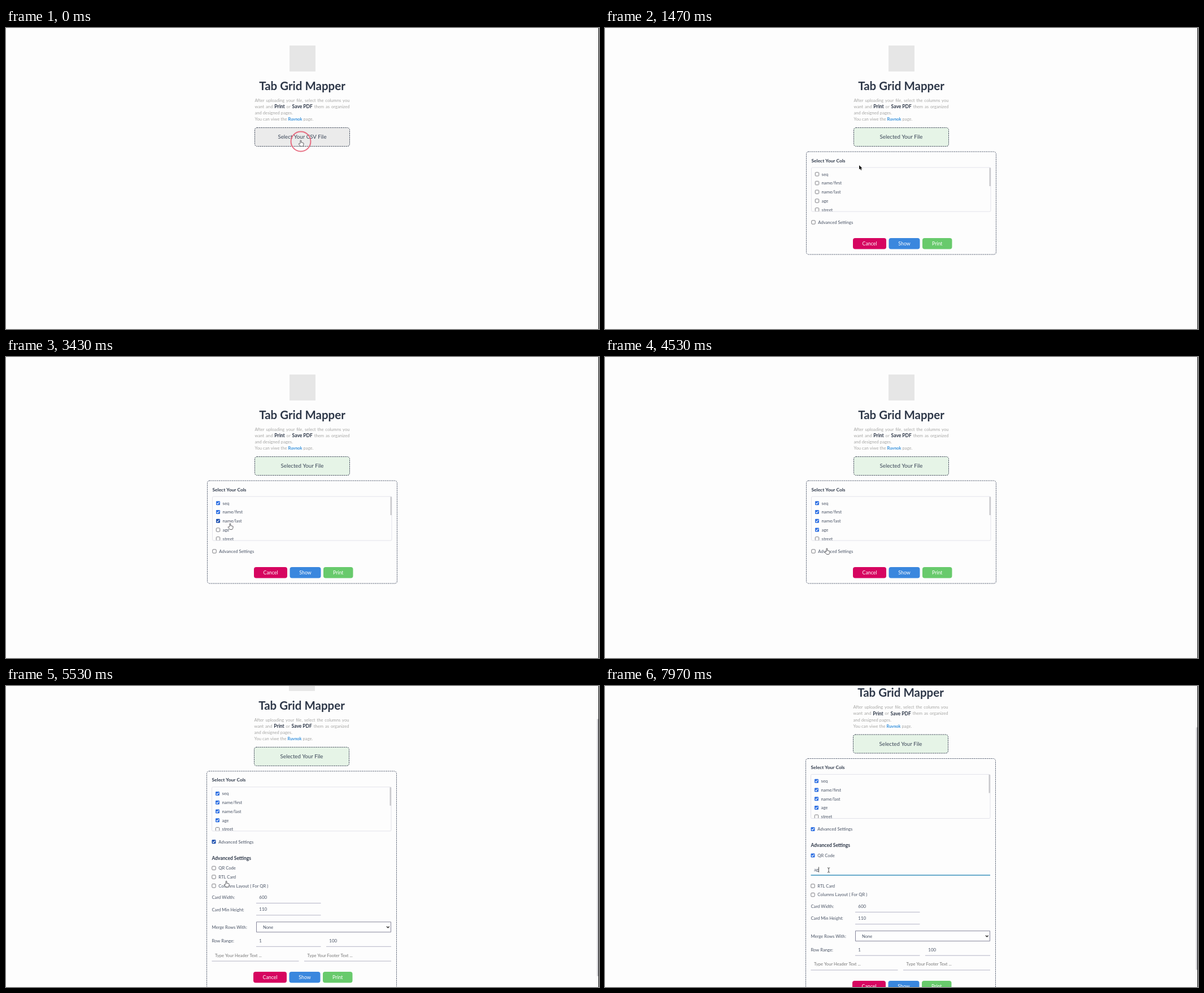
Recreate the animation shown at these times as an HTML page with a canvas. Size 1050 by 533 pixels, loop 8 s.

```html
<!DOCTYPE html>
<html lang="en">
<head>
<meta charset="utf-8">
<title>Tab Grid Mapper</title>
<style>
  html, body { margin: 0; width: 100%; height: 100%; overflow: hidden; background: #fdfdfd; }
  canvas { display: block; }
</style>
</head>
<body>
<canvas id="stage" width="1050" height="533"></canvas>
<script>
const W = 1050, H = 533, LOOP = 8000;
const ctx = document.getElementById('stage').getContext('2d');
const INK = '#2d3748', LABEL = '#485264', MUTED = '#a6a6a4', HINT = '#777777', LINE = '#b4b4c6';

const clamp = (v) => Math.max(0, Math.min(1, v));
const mix = (a, b, u) => a + (b - a) * u;
const mixColor = (a, b, u) => `rgb(${a.map((v, i) => Math.round(mix(v, b[i], u))).join(',')})`;

// Moments at which the page changes state
const PANEL = 870, ADVANCED = 4870, SCROLL = 5270, SCROLL_END = 5970, QR = 6270;
const FOCUS = 6870, TYPE_A = 7400, TYPE_G = 7970;
const SCROLL_MAX = 90.5, QR_HEIGHT = 38.2;

// Columns with the time of checking and of the pointer leaving the row
const columns = [
  ['seq', 2170, 2500],
  ['name/first', 3170, 3300],
  ['name/last', 3400, 3580],
  ['age', 4000, 4300],
  ['street', Infinity, Infinity],
];

// Pointer stops: time, x, y
const pointerPath = [
  [0, 522, 201], [1300, 522, 201], [1470, 450, 244], [1900, 391, 257], [2170, 391, 257],
  [2600, 391, 275], [3170, 391, 275], [3400, 397, 297], [3450, 397, 297], [3630, 393, 302],
  [4050, 393, 302], [4530, 393, 341], [4700, 391, 351], [5450, 391, 351], [5950, 380, 302],
  [6320, 380, 302], [6620, 396, 326],
];

// Clicks: press, release, ring radius on release
const clicks = [
  [-100, 0, 18.5], [2070, 2170, 18], [2970, 3170, 18], [3770, 4000, 18],
  [4770, 4870, 18], [6130, 6270, 16], [6770, 6870, 18],
];
const RING_FADE = 270;

function setFont(size, weight = 400) {
  ctx.font = `${weight} ${size}px Lato, "Open Sans", sans-serif`;
}

// y is the middle of the capital letters
function text(str, x, y, { size = 7.65, weight = 400, color = LABEL, align = 'left' } = {}) {
  setFont(size, weight);
  ctx.fillStyle = color;
  ctx.textAlign = align;
  ctx.fillText(str, x, y + size * 0.36);
}

function box(x, y, w, h, r, fill, stroke, dash = []) {
  ctx.beginPath();
  ctx.roundRect(x, y, w, h, r);
  if (fill) { ctx.fillStyle = fill; ctx.fill(); }
  if (stroke) {
    ctx.strokeStyle = stroke;
    ctx.lineWidth = 1;
    ctx.setLineDash(dash);
    ctx.stroke();
    ctx.setLineDash([]);
  }
}

function rule(x1, x2, y, color = LINE, width = 1) {
  ctx.fillStyle = color;
  ctx.fillRect(x1, y - width / 2, x2 - x1, width);
}

const body = { size: 7.65, color: MUTED };
const strong = { size: 8.5, weight: 700, color: INK };
const link = { size: 7.4, weight: 700, color: '#3490dc' };

// Lays out runs on one line; with a width the line is justified
function textLine(runs, x, y, width) {
  const items = runs.map((run) => Array.isArray(run) ? run : [run, body]);
  const widths = items.map(([str, style]) => {
    setFont(style.size, style.weight);
    return ctx.measureText(str).width;
  });
  const used = widths.reduce((a, b) => a + b, 0);
  const gap = width ? (width - used) / (items.length - 1) : 2;
  items.forEach(([str, style], i) => {
    text(str, x, y, style);
    x += widths[i] + gap;
  });
}

function checkbox(cx, cy, t, checkedAt = Infinity, leftAt = Infinity) {
  const x = cx - 3.5, y = cy - 3.5;
  if (t < checkedAt) {
    box(x + 0.3, y + 0.3, 6.4, 6.4, 1.2, '#fff', '#7d7d82');
    return;
  }
  box(x, y, 7, 7, 1.3, t < leftAt ? '#1c4fae' : '#2f70e2');
  ctx.beginPath();
  ctx.moveTo(cx - 2.1, cy + 0.1);
  ctx.lineTo(cx - 0.7, cy + 1.6);
  ctx.lineTo(cx + 2.2, cy - 1.8);
  ctx.strokeStyle = '#fff';
  ctx.lineWidth = 1.1;
  ctx.stroke();
}

function drawHeader(t) {
  box(502, 31, 46, 46, 0, '#e6e6e6');
  text('Tab Grid Mapper', 524.5, 102.3, { size: 20.5, weight: 700, color: INK, align: 'center' });
  textLine('After uploading your file, select the columns you'.split(' '), 440.5, 128, 168);
  textLine(['want', 'and', ['Print', strong], 'or', ['Save PDF', strong], 'them', 'as', 'organized'],
    440.5, 139, 168);
  textLine(['and', 'designed', 'pages.'], 440.5, 150.5);
  textLine(['You', 'can', 'viwe', 'the', ['Ruvnok', link], 'page.'], 440.5, 161.5);

  const u = clamp((t - PANEL) / 200);
  box(440.5, 176.5, 168, 33, 4, mixColor([235, 235, 235], [230, 244, 231], u), INK, [2, 1.3]);
  text(t < PANEL ? 'Select Your CSV File' : 'Selected Your File', 524.5, 192.8,
    { size: 9.7, align: 'center', color: '#3a4557' });
}

function drawColumns(t) {
  text('Select Your Cols', 365.5, 234.5, { size: 8.4, weight: 700, color: INK });
  box(365.5, 247, 317.5, 78, 2, null, '#e3e3ea');
  ctx.save();
  ctx.beginPath();
  ctx.rect(365, 247, 318, 77.5);
  ctx.clip();
  columns.forEach(([name, checkedAt, leftAt], i) => {
    const y = 258.8 + 15.75 * i;
    checkbox(375.5, y, t, checkedAt, leftAt);
    text(name, 383.5, y, { size: 7.8 });
  });
  ctx.restore();
  box(680.5, 247.5, 2.5, 32.5, 0, '#c9c9cd');
}

function option(label, y, t, checkedAt, leftAt) {
  checkbox(369, y, t, checkedAt, leftAt);
  text(label, 377.3, y);
}

function drawQrField(t) {
  const focused = t >= FOCUS, y = 415.5;
  const typed = t >= TYPE_G ? 'ag' : t >= TYPE_A ? 'a' : '';
  if (typed) text(typed, 371, y, { size: 8 });
  else text('Type Your QR Data Or Selected Cols Name ...', 371, y, { size: 7.45, color: HINT });
  if (focused) {
    setFont(8);
    ctx.fillStyle = '#222';
    ctx.fillRect(371 + ctx.measureText(typed).width, y - 4.5, 0.8, 9.5);
  }
  rule(365.5, 683, 425.5, focused ? '#3a93bd' : LINE, focused ? 1.5 : 1);
}

function drawAdvanced(t) {
  const value = { size: 7.9 };
  text('Advanced Settings', 365.5, 372.7, { size: 8.45, weight: 700, color: INK });
  option('QR Code', 390.6, t, QR, 6480);
  if (t >= QR) drawQrField(t);

  ctx.save();
  ctx.translate(0, t >= QR ? QR_HEIGHT : 0);
  option('RTL Card', 406.3, t);
  option('Columns Layout ( For QR )', 422, t);
  text('Card Width:', 365.5, 442.7);
  text('600', 449.3, 442.3, value);
  rule(444, 558.5, 452.7);
  text('Card Min Height:', 365.5, 464);
  text('110', 449.3, 463.6, value);
  rule(444, 558.5, 474);
  text('Merge Rows With:', 365.5, 495.6);
  box(444.5, 486, 238, 18, 0, '#fefefe', '#85859a');
  text('None', 456, 495.3);
  ctx.beginPath();
  ctx.moveTo(675, 494);
  ctx.lineTo(677.3, 496.3);
  ctx.lineTo(679.6, 494);
  ctx.strokeStyle = '#222';
  ctx.lineWidth = 1.3;
  ctx.stroke();
  text('Row Range:', 365.5, 519.7);
  text('1', 449.3, 519.3, value);
  text('100', 573.3, 519.3, value);
  rule(444, 558.5, 529.5);
  rule(568, 683, 529.5);
  text('Type Your Header Text ...', 371, 545, { size: 7.6, color: HINT });
  text('Type Your Footer Text ...', 534.5, 545, { size: 7.6, color: HINT });
  rule(365.5, 519.5, 555.3);
  rule(529, 683, 555.3);
  ctx.restore();
}

function button(label, x, w, y, fill) {
  box(x, y, w, 19.5, 4, fill);
  text(label, x + w / 2, y + 9.8, { size: 8.8, color: '#fff', align: 'center' });
}

function drawPanel(t) {
  const buttonTop = t < ADVANCED ? 372 : 574.3 + (t >= QR ? QR_HEIGHT : 0);
  ctx.globalAlpha = clamp((t - PANEL) / 200);
  box(356.5, 219, 336, buttonTop + 29 - 219, 4, null, '#465064', [2, 1.3]);
  drawColumns(t);
  option('Advanced Settings', 344, t, ADVANCED, 5550);
  if (t >= ADVANCED) drawAdvanced(t);
  button('Cancel', 439, 59, buttonTop, '#d60560');
  button('Show', 502.5, 55, buttonTop, '#3a87de');
  button('Print', 562, 52.5, buttonTop, '#68ca6c');
  ctx.globalAlpha = 1;
}

function pointerAt(t) {
  const next = pointerPath.findIndex(([time]) => time > t);
  if (next < 0) return pointerPath[pointerPath.length - 1].slice(1);
  const [t0, x0, y0] = pointerPath[next - 1], [t1, x1, y1] = pointerPath[next];
  const u = (t - t0) / (t1 - t0), eased = u * u * (3 - 2 * u);
  return [mix(x0, x1, eased), mix(y0, y1, eased)];
}

const hand = new Path2D('M3 6V1.2a.9.9 0 0 1 1.8 0V4.2l3 .6q1.5.3 1.3 1.8l-.5 2.4' +
  'q-.3 1.5-1.3 1.9H4q-1 0-1.6-1L.4 7.2q-.4-1 .5-1.3.7 0 1.3.8z');
const arrow = new Path2D('M0 0V7.6L1.8 6 3.1 8.8 4.5 8.2 3.2 5.5H5.6z');

function drawPointer(t) {
  const [x, y] = pointerAt(t);
  const overButton = t < 1330, overRow = x < 421 && y > 251 && (y < 328 || y > 336);
  ctx.save();
  ctx.translate(x, y);
  if (t >= 6560) {
    ctx.strokeStyle = '#444';
    ctx.lineWidth = 0.9;
    ctx.beginPath();
    for (const s of [-1, 1]) {
      ctx.moveTo(-2.2, 4.2 * s);
      ctx.quadraticCurveTo(0, 4.2 * s, 0, 2.8 * s);
      ctx.quadraticCurveTo(0, 4.2 * s, 2.2, 4.2 * s);
    }
    ctx.moveTo(0, -3);
    ctx.lineTo(0, 3);
    ctx.stroke();
  } else if (overButton || overRow) {
    ctx.translate(-4, -2.5);
    ctx.fillStyle = '#fff';
    ctx.fill(hand);
    ctx.strokeStyle = '#4a4a4e';
    ctx.lineWidth = 0.9;
    ctx.stroke(hand);
  } else {
    ctx.translate(0, -1);
    ctx.strokeStyle = '#fff';
    ctx.lineWidth = 1.4;
    ctx.stroke(arrow);
    ctx.fillStyle = '#111';
    ctx.fill(arrow);
  }
  ctx.restore();
}

function drawRing(t) {
  const click = clicks.find(([down, up]) => t >= down && t < up + RING_FADE);
  if (!click) return;
  const [, up, releaseRadius] = click;
  const u = clamp((t - up) / RING_FADE);
  const radius = t < up ? 21 : releaseRadius * (1 - 0.6 * u);
  const [x, y] = pointerAt(t);
  ctx.beginPath();
  ctx.arc(x, y, radius - 1, 0, Math.PI * 2);
  ctx.strokeStyle = `rgba(228,88,112,${0.85 * (1 - u)})`;
  ctx.lineWidth = 2;
  ctx.stroke();
}

function drawScrollbar(t, scroll) {
  if (t < ADVANCED) return;
  const ratio = H / (t < QR ? 623.5 : 661);
  box(1046.5, scroll * ratio, 2.5, H * ratio, 1, '#c4c4c8');
}

function draw(t) {
  const scroll = SCROLL_MAX * (1 - (1 - clamp((t - SCROLL) / (SCROLL_END - SCROLL))) ** 3);
  ctx.fillStyle = '#fdfdfd';
  ctx.fillRect(0, 0, W, H);
  ctx.save();
  ctx.translate(t < ADVANCED ? 0 : -1, -scroll);
  drawHeader(t);
  if (t >= PANEL) drawPanel(t);
  ctx.restore();
  drawScrollbar(t, scroll);
  drawRing(t);
  drawPointer(t);
  ctx.fillStyle = '#000';
  ctx.fillRect(W - 1, 0, 1, H);
}

const start = performance.now();
function tick() {
  draw((performance.now() - start) % LOOP);
  requestAnimationFrame(tick);
}
tick();
</script>
</body>
</html>
```
